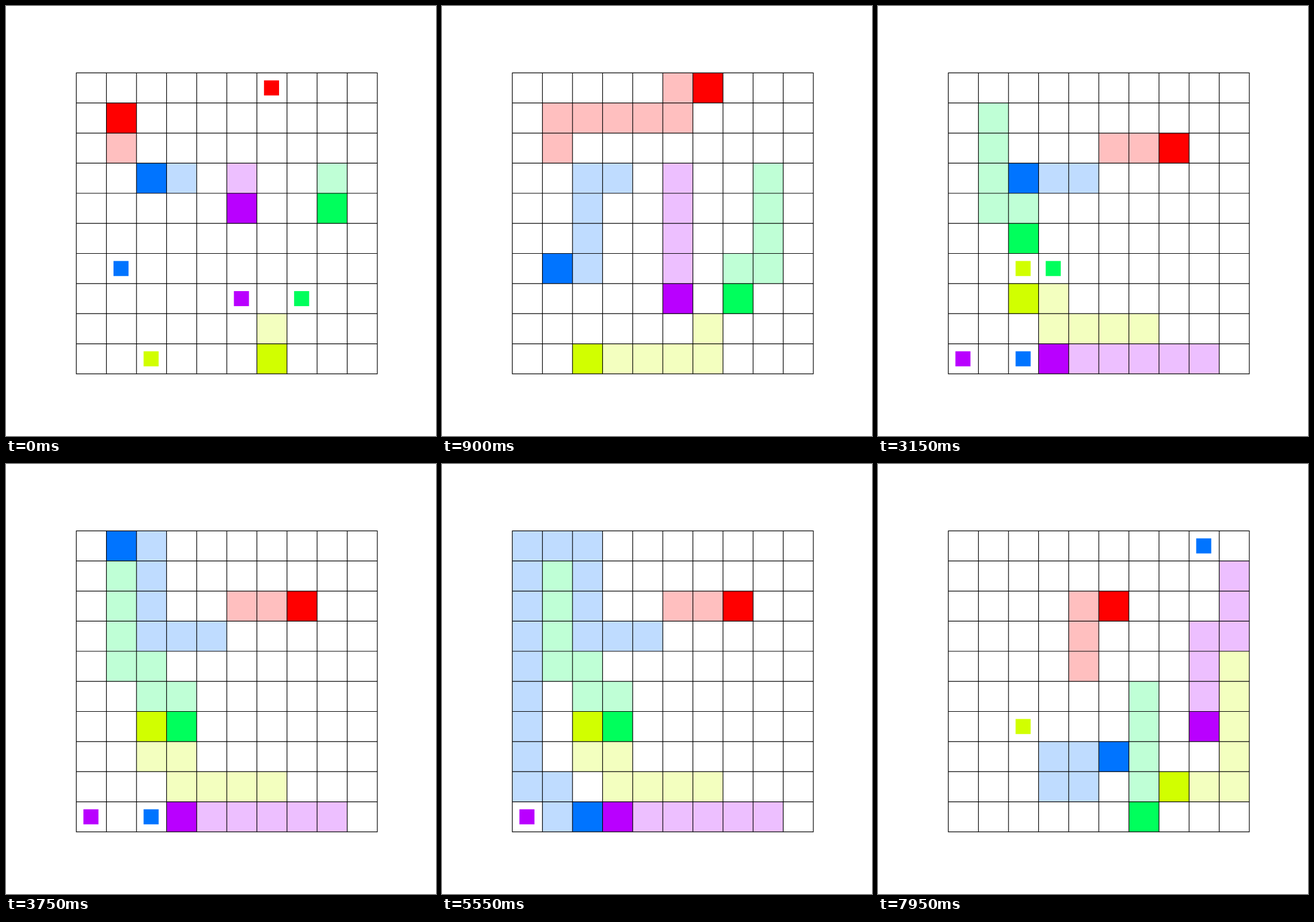
Recreate the animation shown at these times as an HTML page with a canvas. Size 748x748 px, loop 8000 ms.

```html
<!DOCTYPE html>
<html lang="en">
<head>
<meta charset="utf-8">
<style>
  html, body { margin: 0; width: 100%; height: 100%; overflow: hidden; background: #fff; }
  canvas { display: block; }
</style>
</head>
<body>
<canvas id="stage" width="748" height="748"></canvas>
<script>
const ctx = document.getElementById('stage').getContext('2d');
// The board is laid out on a 1000-unit square scaled to the stage.
const VIEW = 1000, SIZE = 10, CELL = 70, LEFT = 163.5, TOP = 155.5;
const LOOP = 8000, STEP = 150;
const COLORS = ['#ff0000', '#d1ff00', '#00ff5c', '#0074ff', '#b900ff'];
const TINTS = ['#ffbfbf', '#f3ffbf', '#bfffd6', '#bfdcff', '#edbfff'];
const MOVES = { U: [0, -1], D: [0, 1], L: [-1, 0], R: [1, 0], '.': [0, 0] };

// Each agent, in color order: start cell, moves ('.' waits), goal cell.
const SCENES = [
  { start: 0, agents: [
    [[1, 2], 'URRRRUR', [6, 0]],
    [[6, 8], 'DLLLL', [2, 9]],
    [[8, 3], 'DDDLD', [7, 7]],
    [[3, 3], 'LDDDL', [1, 6]],
    [[5, 3], 'DDDD', [5, 7]]] },
  { start: 2550, agents: [
    [[5, 2], 'RR', [7, 2]],
    [[6, 8], 'LLLULU', [2, 6]],
    [[1, 1], 'DDDRDRD', [3, 6]],
    [[4, 3], '...LLUUULLDDDDDDDDRDR', [2, 9]],
    [[8, 9], 'LLLLL', [0, 9]]] },
  { start: 7200, agents: [
    [[4, 4], 'UUR', [5, 2]],
    [[9, 4], 'DDDDLL', [2, 6]],
    [[6, 5], 'DDDD', [6, 9]],
    [[4, 8], '..LURR', [8, 0]],
    [[9, 1], 'DDLDDD', [8, 6]]] }
];

function fillCell([col, row], color) {
  ctx.fillStyle = color;
  ctx.fillRect(LEFT + col * CELL, TOP + row * CELL, CELL, CELL);
}

function drawGoal([col, row], color) {
  ctx.fillStyle = color;
  ctx.fillRect(180 + col * CELL, 173 + row * CELL, CELL / 2, CELL / 2);
}

function drawAgent([start, moves, goal], i, step) {
  let cell = start;
  drawGoal(goal, COLORS[i]);
  for (const move of moves.slice(0, step)) {
    fillCell(cell, TINTS[i]);
    const [dx, dy] = MOVES[move];
    cell = [cell[0] + dx, cell[1] + dy];
  }
  fillCell(cell, COLORS[i]);
}

function drawGrid() {
  const span = SIZE * CELL;
  ctx.lineWidth = 1.6;
  ctx.lineCap = 'square';
  ctx.beginPath();
  for (let d = 0; d <= span; d += CELL) {
    ctx.moveTo(LEFT + d, TOP);
    ctx.lineTo(LEFT + d, TOP + span);
    ctx.moveTo(LEFT, TOP + d);
    ctx.lineTo(LEFT + span, TOP + d);
  }
  ctx.stroke();
}

function draw() {
  const time = performance.now() % LOOP;
  const scene = SCENES.filter(s => s.start <= time).pop();
  const step = 1 + Math.floor((time - scene.start) / STEP);
  ctx.fillStyle = '#fff';
  ctx.fillRect(0, 0, VIEW, VIEW);
  scene.agents.forEach((agent, i) => drawAgent(agent, i, step));
  drawGrid();
  requestAnimationFrame(draw);
}

ctx.scale(748 / VIEW, 748 / VIEW);
draw();
</script>
</body>
</html>
```
